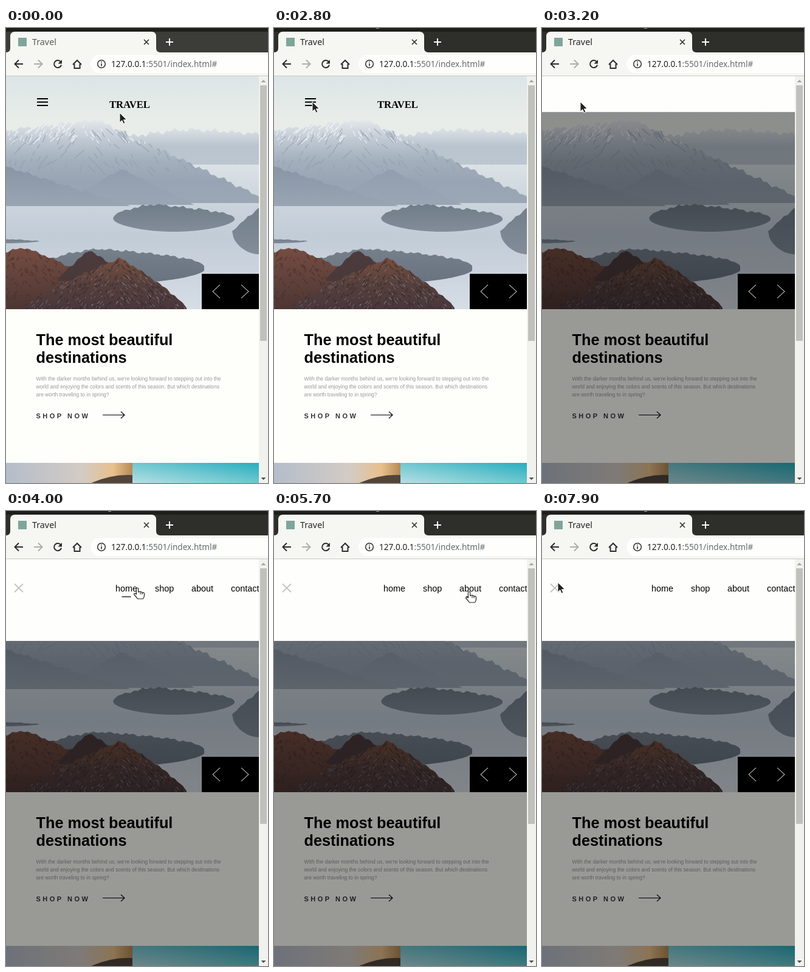
Animation, 431 px wide and 746 px high, one loop 8 s. Source, as an HTML page:

```html
<!DOCTYPE html>
<html lang="en">
<head>
<meta charset="utf-8">
<title>Travel</title>
<style>
  html, body { margin: 0; width: 100%; height: 100%; overflow: hidden; background: #fefefa; }
  svg { display: block; width: 431px; height: 746px; }
  text { font-family: "Liberation Sans", Arial, sans-serif; white-space: pre; }
  .ui { font-family: "Noto Sans", sans-serif; }
  .line { fill: none; stroke: #2c2c2a; stroke-width: 2; }
  .logo { font: bold 16.8px "Liberation Serif", serif; letter-spacing: -.15px; }
  .title { font-weight: bold; font-size: 25.3px; }
  .body { font-size: 8.62px; fill: #999; }
  .cta { font-weight: bold; font-size: 11px; letter-spacing: 3.5px; fill: #333; }
  .nav { font-size: 14.4px; }
</style>
</head>
<body>
<svg viewBox="0 0 431 746">
  <defs>
    <linearGradient id="dusk">
      <stop stop-color="#b4bdca"/><stop offset=".6" stop-color="#d3cbc5"/><stop offset=".85" stop-color="#e8c08b"/><stop offset="1" stop-color="#b48a58"/>
    </linearGradient>
    <linearGradient id="sea" y1="1" x2="1" y2="0">
      <stop stop-color="#b5dfe3"/><stop offset=".5" stop-color="#70c7d1"/><stop offset="1" stop-color="#27aebf"/>
    </linearGradient>
    <clipPath id="frame"><path d="M0 79H416V461H0z"/></clipPath>
    <clipPath id="page"><path d="M0 79H416V746H0z"/></clipPath>
  </defs>

  <g clip-path="url(#page)">
    <path fill="#fefefa" d="M0 79H416V746H0z"/>
    <path fill="url(#dusk)" d="M0 713H208V746H0z"/>
    <path fill="#51443a" d="M140 746Q175 731 208 733V746z"/>
    <path fill="url(#sea)" d="M208 713H416V746H208z"/>
    <path id="dimLow" d="M0 461H416V746H0z"/>
    <g id="photo" clip-path="url(#frame)"></g>
    <path id="burger" fill="none" stroke="#000" stroke-width="2" d="M51 116H69M51 121.5H69M51 127H69"/>
    <text class="logo" x="170" y="131">TRAVEL</text>
    <text class="title" x="49.5" y="520">The most beautiful</text>
    <text class="title" x="49.5" y="549">destinations</text>
    <text class="body" x="49.5" y="578">With the darker months behind us, we're looking forward to stepping out into the</text>
    <text class="body" x="49.5" y="591">world and enjoying the colors and scents of this season. But which destinations</text>
    <text class="body" x="49.5" y="604">are worth traveling to in spring?</text>
    <text class="cta" x="49.5" y="640">SHOP NOW</text>
    <path fill="none" stroke="#000" stroke-width="1.1" d="M159 634.5H195M189 629L195 634.5 189 640"/>
    <path id="dimHigh" d="M0 79H416V746H0z"/>
    <path d="M322 403H416V461H322z"/>
    <path fill="none" stroke="#fff" d="M352 421L340 432 352 443M387 421L399 432 387 443"/>
    <g id="menu">
      <path fill="#fefefc" d="M0 79H416V213H0z"/>
      <path fill="none" stroke="#c3c3bf" stroke-width="1.8" d="M14 119.5L28 133M28 119.5L14 133"/>
      <g id="links"></g>
    </g>
    <g id="status">
      <path fill="#f4f4f1" stroke="#c9c9c5" d="M-1 725.5H137Q141 725.5 141 729.5V747H-1z"/>
      <text class="ui" x="4.5" y="741" font-size="14.4" fill="#5f6368">127.0.0.1:5501/in…</text>
    </g>
  </g>

  <path fill="#f1f1ee" d="M416 79H431V746H416z"/>
  <path fill="#c0c0bc" d="M418 94H429V513H418z"/>
  <path fill="#a3a3a0" d="M419.5 89L423.5 85 427.5 89z"/>
  <path fill="#50504e" d="M419.5 737L423.5 741 427.5 737z"/>

  <path id="bar" d="M0 0H431V40H0z"/>
  <path fill="#1e1e1b" d="M0 0H431V6H0z"/>
  <path id="caption" fill="#9b9b96" d="M168 0H173V1H168z"/>
  <path fill="#f6f6f2" d="M0 40Q7 40 7 33V14Q7 6 15 6H239Q247 6 247 14V33Q247 40 254 40H431V78H0z"/>
  <path fill="#c9c9c5" d="M0 78H431V79H0z"/>
  <path fill="#fefefc" d="M431 44H154A15 15 0 0 0 154 74H431z"/>
  <rect x="20" y="16" width="14" height="14" fill="#7fa59b"/>
  <text class="ui tab" x="43" y="28" font-size="14.3">Travel</text>
  <path class="line" style="stroke-width:1.6" d="M227 19L235 27M235 19L227 27"/>
  <path class="line" style="stroke:#fff" d="M263 23H275M269 17V29"/>
  <path class="line" d="M28 59H15M21 52.5L14.5 59 21 65.5"/>
  <path class="line" style="stroke:#adadaa" d="M46 59H59M53 52.5L59.5 59 53 65.5"/>
  <path class="line" d="M90 55.5A6 6 0 1 0 91 60.5"/>
  <path fill="#2c2c2a" d="M92 52V58.5H85.5z"/>
  <path class="line" d="M110 60L117 53 124 60M112.5 59V66H121.5V59"/>
  <circle class="line" style="stroke-width:1.5" cx="157" cy="59" r="6.3"/>
  <path class="line" style="stroke-width:1.6" d="M157 58V62.5M157 55V56.6"/>
  <text class="ui" x="173" y="64" font-size="13.6" fill="#666b6e"><tspan fill="#1d1d1b">127.0.0.1</tspan>:5501/index.html#</text>

  <g id="cursor">
    <path id="arrow" fill="#222" stroke="#fff" d="M0 0V16L3.8 12.5 6.2 18 8.8 16.8 6.5 11.5H11.5z"/>
    <path id="hand" fill="#fff" stroke="#222" stroke-width="1.2" stroke-linejoin="round"
      d="M-1.6 1Q0 -1 1.6 1V7Q6 5 8 8 11 7 11.5 9.5V13Q11 16 9.5 18H.5Q-2 14.5 -5.3 11 -5.5 8.5 -3.3 9L-1.6 10.5zM5 7.5V10.5M8 8.3V10.8"/>
  </g>
</svg>
<script>
const $ = id => document.getElementById(id);
const LOOP = 8000, STEP = 100;
const CLICK = 2800, RAISE = 3200, MENU_OPEN = 3500, LEAVE = 7000;
const clamp = v => Math.min(1, Math.max(0, v));
const show = (id, on) => $(id).style.visibility = on ? 'visible' : 'hidden';

// ---- landscape ----
let seed = 11;
const rand = () => (seed = (seed * 16807) % 2147483647) / 2147483647;

function gradient(id, colors) {
  const stops = colors.map((c, i) => `<stop offset="${i / (colors.length - 1 || 1)}" stop-color="${c}"/>`);
  return `<linearGradient id="${id}" x2="0" y2="1">${stops.join('')}</linearGradient>`;
}

// A slope rises to its peak by a power curve; depth rounds its underside.
function hill(id, { from, to, base, peak: [px, py], curve = 1, depth = 0, rough = 1, colors }) {
  const top = [], bottom = [];
  for (let x = from; x <= to; x += 2) {
    const u = x < px ? (x - from) / (px - from) : (to - x) / (to - px);
    const bump = rough * (Math.sin(x * 0.19 + py) + Math.sin(x * 0.47) + rand() - 0.5);
    top.push(`${x} ${(base - (base - py) * u ** curve + bump * Math.min(1, u * 5)).toFixed(1)}`);
    const arch = Math.sqrt(Math.sin(Math.PI * (x - from) / (to - from + 1)));
    bottom.unshift(`${x} ${(base + depth * arch).toFixed(1)}`);
  }
  const d = `M${top.concat(bottom).join('L')}z`;
  return `${gradient(id + 'Fill', colors)}<clipPath id="${id}"><path d="${d}"/></clipPath>
    <path d="${d}" fill="url(#${id}Fill)"/>`;
}

// Short seeded strokes that run downhill on both sides of a peak.
function grain(id, color, { x = 0, y, w, h, peak, length, count, width = 1.5 }) {
  let d = '';
  while (count--) {
    const sx = x + rand() * w, l = length * (0.4 + rand()), lean = (sx < peak ? -1 : 1) * (0.3 + rand());
    d += `M${sx.toFixed(1)} ${(y + rand() * h).toFixed(1)}l${(lean * l).toFixed(1)} ${l.toFixed(1)}`;
  }
  return `<path d="${d}" fill="none" stroke="${color}" stroke-width="${width}" opacity=".6" clip-path="url(#${id})"/>`;
}

const snow = { y: 150, w: 260, h: 34, peak: 130, length: 8, count: 110 };
const scrub = { x: 25, y: 378, w: 270, h: 84, peak: 188, length: 4, count: 420 };
const stone = ['#717c89', '#828d99'];

$('photo').innerHTML = [
  gradient('sky', ['#dce5e6', '#e8ede9', '#e8ece8']),
  gradient('lake', ['#dbe3e7', '#ccd5dd', '#c2ccd7', '#cbd4de', '#d6dde5']),
  '<path d="M0 79H416V222H0z" fill="url(#sky)"/><path d="M0 222H416V461H0z" fill="url(#lake)"/>',
  hill('range', { from: 120, to: 600, base: 224, peak: [300, 166], curve: 0.3, rough: 2, colors: ['#dde3e7', '#b9c4ce', '#bcc6d0'] }),
  hill('main', { from: -1000, to: 440, base: 287, peak: [150, 150], rough: 1.8,
    colors: ['#e6eaed', '#c0c9d3', '#a4afbd', '#98a4b3', '#9ca7b5'] }),
  grain('main', '#fff', snow),
  grain('main', '#8f9cac', { ...snow, y: 162, h: 70, w: 320, length: 11 }),
  hill('middle', { from: 85, to: 310, base: 290, peak: [190, 231], colors: ['#929eae', '#9aa6b4'] }),
  hill('left', { from: -300, to: 205, base: 292, peak: [-10, 224], colors: ['#8895a5', '#99a5b3'] }),
  hill('spit', { from: -60, to: 55, base: 349, peak: [0, 346], depth: 4, rough: 0.3, colors: stone }),
  hill('island', { from: 176, to: 376, base: 312, peak: [240, 289], curve: 0.5, depth: 22, colors: stone }),
  hill('shore', { from: 372, to: 460, base: 333, peak: [430, 282], depth: 38, colors: stone }),
  hill('cape', { from: 60, to: 327, base: 394, peak: [150, 362], curve: 0.4, depth: 24, colors: ['#76808b', '#69737f'] }),
  hill('moor', { from: -200, to: 170, base: 461, peak: [30, 360], curve: 0.5, colors: ['#764c41', '#61423b', '#4c3532'] }),
  grain('moor', '#3e2d2e', { ...scrub, x: 0, w: 150, y: 360, peak: 30, count: 200 }),
  hill('rock', { from: 85, to: 200, base: 415, peak: [138, 364], curve: 0.8, colors: ['#4c3b3c', '#49393b'] }),
  hill('crest', { from: 25, to: 298, base: 461, peak: [188, 377], curve: 0.8, colors: ['#78503f', '#56403d', '#49373a'] }),
  grain('crest', '#30272c', scrub),
  grain('crest', '#9b9aa6', { ...scrub, y: 395, count: 240, width: 1 })
].join('');

// ---- menu ----
const links = [['home', 180, 36], ['shop', 245, 31], ['about', 305, 37], ['contact', 370, 46]];
$('links').innerHTML = links.map(([name, x, w]) =>
  `<text class="nav" x="${x}" y="132">${name}</text><path class="under" d="M${x + w / 2 - 7.5} 0h15v1.2h-15z"/>`).join('');
const unders = [...document.querySelectorAll('.under')];

// ---- pointer stops: time, x, y ----
const stops = [
  [100, 187, 139], [300, 201, 127], [900, 201, 127], [1100, 187, 137], [1300, 206, 122], [1500, 190, 139],
  [2200, 106, 122], [2500, 63, 121], [3400, 63, 121], [3900, 205, 127], [4000, 216, 126], [4200, 216, 126],
  [4500, 303, 131], [4700, 316, 130], [4900, 268, 131], [5100, 268, 131], [5700, 321, 132], [6000, 321, 132],
  [6500, 388, 130], [7000, 388, 130], [7200, 300, 112], [7700, 34, 114], [7900, 26, 117]
];

function pointer(t) {
  const next = stops.findIndex(s => s[0] > t);
  if (next < 1) return stops.at(next).slice(1);
  const [a, ax, ay] = stops[next - 1], [b, bx, by] = stops[next];
  const k = (t - a) / (b - a);
  return [ax + (bx - ax) * k, ay + (by - ay) * k];
}

function hovered(t) {
  if (t <= MENU_OPEN || t >= LEAVE) return -1;
  const [x] = pointer(t);
  return links.findIndex(([, left, w]) => x >= left && x <= left + w);
}

function render(time) {
  const t = Math.floor((time % LOOP) / STEP) * STEP;
  const focused = t >= CLICK;
  $('bar').setAttribute('fill', focused ? '#2e2e2a' : '#3c3c39');
  document.querySelector('.tab').setAttribute('fill', focused ? '#252523' : '#5c5c59');
  show('caption', focused);
  show('burger', t <= CLICK);

  // The shade first darkens only the page behind, then rises above everything.
  const dim = 0.4 * clamp((t - CLICK) / 200);
  $('dimLow').setAttribute('opacity', t < RAISE ? dim : 0);
  $('dimHigh').setAttribute('opacity', t < RAISE ? 0 : dim);

  const slide = (1 - clamp((t - 3100) / (MENU_OPEN - 3100))) ** 2;
  $('menu').setAttribute('transform', `translate(0 ${-134 * slide})`);

  const recent = [0, 1, 2].map(n => hovered(t - n * STEP));
  unders.forEach((line, i) => {
    const k = recent.filter(h => h === i).length / recent.length;
    line.setAttribute('transform', `translate(0 ${136 + 6 * k})`);
    line.setAttribute('opacity', Math.min(1, 2 * k));
  });
  show('status', hovered(t - 3 * STEP) >= 0);

  $('cursor').setAttribute('transform', `translate(${pointer(t)})`);
  show('hand', recent[0] >= 0);
  show('arrow', recent[0] < 0);
}

const start = performance.now();
function tick() {
  render(performance.now() - start);
  requestAnimationFrame(tick);
}
tick();
</script>
</body>
</html>
```
